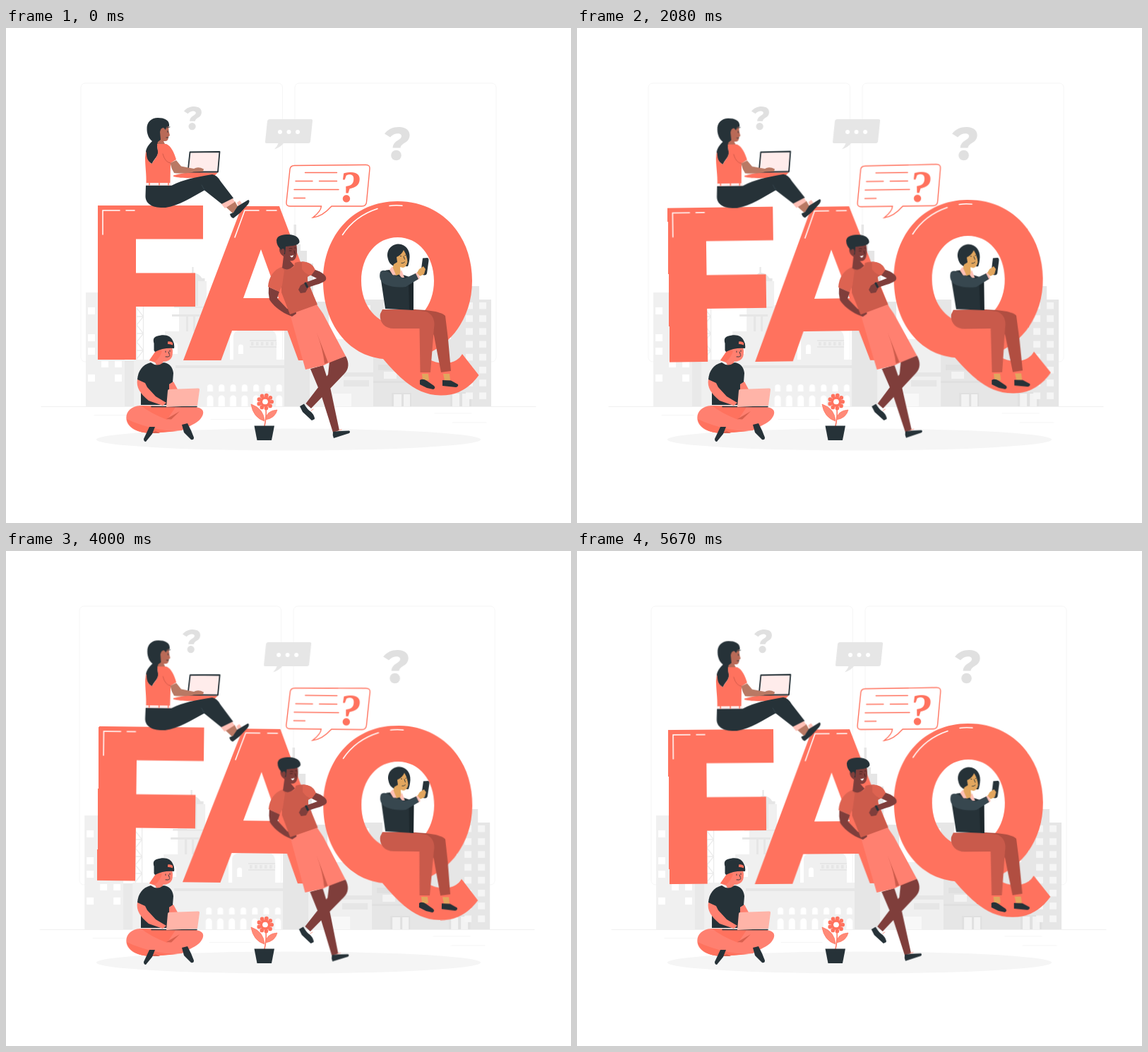
These frames come from a looping animation (800x700 px, 5.71 s). An HTML page:

```html
<!DOCTYPE html>
<html lang="en">
<head>
<meta charset="utf-8">
<title>FAQ</title>
<style>
  html, body { margin: 0; width: 100%; height: 100%; overflow: hidden; background: #fff; }
  svg { display: block; width: 100vw; height: 100vh; }

  .sway { animation: sway 5.71s linear infinite; }
  .slide { animation: slide 5.71s linear infinite; }
  #letters { transform-origin: 400px 382px; }
  #typist { transform-origin: 271px 198px; }
  #bubble { transform-origin: 456px 231px; }
  #leaner { transform-origin: 429px 436px; }
  #caller { transform-origin: 585px 408px; }

  /* A 3 s cycle, cut off at 5.71 s */
  @keyframes sway {
    0% { transform: rotate(0deg); }
    13.135%, 65.674% { transform: rotate(1deg); }
    39.405%, 91.944% { transform: rotate(-1deg); }
    100% { transform: rotate(-.387deg); }
  }
  @keyframes slide {
    0%, 52.539% { transform: translateX(0); }
    5.254%, 47.285%, 57.793%, 99.825% { transform: translateX(-1.4px); }
    10.508%, 42.032%, 63.047%, 94.571% { transform: translateX(2.8px); }
    15.762%, 26.27%, 36.778%, 68.301%, 78.809%, 89.317% { transform: translateX(-5.6px); }
    21.016%, 31.524%, 73.555%, 84.063% { transform: translateX(5.6px); }
    100% { transform: translateX(-1.35px); }
  }

  .coral { fill: #ff725e; }
  .dark { fill: #263238; }
  .white { fill: #fff; }
  .g1 { fill: #f0f0f0; }
  .g2 { fill: #e6e6e6; }
  .g3 { fill: #e0e0e0; }
  .line { fill: none; stroke-linecap: round; }
  .flat { fill: none; }
  .shine { stroke: #fff; stroke-width: 1.5; }
</style>
</head>
<body>
<svg viewBox="0 0 800 700">
  <defs>
    <g id="mark" class="g3">
      <path d="M536 149.500C541 143 548 140 556 140C566 140 572 145 571.500 152C571 163 559.500 162 558.500 169.500H547.500C548 159 559.500 159 560 153C560 147.500 549 148 544 154.500z"/>
      <circle cx="552.500" cy="180" r="7.300"/>
    </g>
    <pattern id="arches" x="282" y="503" width="16.300" height="32" patternUnits="userSpaceOnUse">
      <path class="white" d="M3 11V5a4 4 0 0 1 8 0v6zM2.500 32V21a4.500 4.500 0 0 1 9 0v11z"/>
    </pattern>
    <pattern id="panes" x="651" y="388" width="19" height="18.200" patternUnits="userSpaceOnUse">
      <path fill="#f5f5f5" d="M0 0h10v9.500H0z"/>
    </pattern>
  </defs>

  <g class="slide">
    <g fill="none" stroke="#f5f5f5">
      <rect x="106" y="78" width="285.500" height="394" rx="6"/>
      <rect x="409" y="78" width="285" height="394" rx="6"/>
    </g>

    <!-- left block and mast -->
    <path class="g1" d="M113 374h55v161h-55z"/>
    <path fill="#e9e9e9" d="M168 470h28v65h-28z"/>
    <path class="white" d="M116 395h10v10h-10zM116 433h10v10h-10zM116 452h10v10h-10zM116 490h10v10h-10zM135 471h10v9h-10zM154 471h10v9h-10zM154 490h10v10h-10z"/>
    <path class="line" stroke="#ebebeb" stroke-width="1.300" d="M185 392V470M194.500 392V470M185 396l9.500 12-9.500 12 9.500 12-9.500 12 9.500 12-9.500 12M185 408h9.500m-9.500 24h9.500m-9.500 24h9.500"/>

    <!-- domed hall -->
    <path class="g1" d="M245 392h75v40h-75zM225 429h92v45h-92zM322 436q0-9 14-9h38q9 1 9 13v32h-61z"/>
    <path class="g2" d="M263.500 338h2v8q8 1 12 8h4v4h-28v-4h4q2-7 6-8zM238 393h44v2.500h-44zM235 405h40v3h-40zM255 408h3v21h-3zM265 408h3v21h-3z"/>
    <path class="g1" d="M258 358h26v36h-26z"/>
    <path class="g2" d="M268 358h4v35h-4zM345 441h38v2h-38zM345 450h38v2h-38z"/>
    <path class="flat" stroke="#e6e6e6" stroke-width="5" stroke-dasharray="3.500 3.500" d="M347 446.500h36"/>
    <path class="white" d="M329 461v-10a3.500 3.500 0 0 1 7 0v10zM235 461v-12a4 4 0 0 1 8 0v12z"/>
    <path class="g1" d="M181 469h219v66H181z"/>
    <path class="g2" d="M240 477h160v4H240z"/>
    <path fill="url(#arches)" d="M282 503h112v32H282z"/>

    <!-- spire tower -->
    <path class="g2" d="M407.500 278h3.500v28h6v9h9v18h9v54h22v148h-63V390h6V315h7.500z"/>

    <!-- right blocks -->
    <path class="g1" d="M430 440h90v95h-90z"/>
    <path class="g2" d="M478 487h42v6h-42zM478 498h36v9h-36zM503 384h32v70h-32z"/>
    <path fill="#f8f8f8" d="M463 517h26v18h-26zM507 392h9v9h-9z"/>
    <path class="g2" d="M520 440h110v95H520zM630 384h25v-19h15v19h17v151h-57z"/>
    <path class="g3" d="M520 499h70v3h-70zM527 476h28v8h-28zM546 516h28v19h-28zM629 515h30v20h-30z"/>
    <path fill="#f3f3f3" d="M535 486h18v10h-18zM549 518h11v17h-11zM563 518h9v17h-9zM632 517h10v18h-10zM646 517h10v18h-10z"/>
    <path fill="url(#panes)" d="M642 386h42v140h-42z"/>

    <path class="line" stroke="#f0f0f0" d="M50 535.500H750"/>
    <path class="line" stroke="#f5f5f5" d="M125 547.500h45M290 553.500h58M607 545h52M632 558h48"/>

    <use href="#mark"/>
    <use href="#mark" transform="translate(-124.300 12.700) scale(.702)"/>
    <path class="g2" d="M373 129h59q2.500 0 2 2.500l-3 29q-.5 2.500-3 2.500h-35q-5 6-13 8.500 4-4 5.500-8.500H369q-2.500 0-2-2.500l3-29q.5-2.500 3-2.500z"/>
    <g class="white">
      <circle cx="388" cy="147" r="3"/><circle cx="400.500" cy="147" r="3"/><circle cx="413" cy="147" r="3"/>
    </g>
  </g>

  <ellipse cx="400" cy="582" rx="272" ry="15.500" fill="#f5f5f5"/>

  <g id="letters" class="sway">
    <path class="coral" d="M130 251H279V298.500H184V346.500H268V394H184V469H130z"/>
    <path class="coral" fill-rule="evenodd" d="M334 252H387L470 470H414L398.500 428H320L304.500 470H251zM361 313L336 382H386z"/>
    <path class="coral" fill-rule="evenodd" d="M554.500 245C616 245 660 292 660 357.500C660 408 632 448 591 463C602 474 634 482 646 461L669.500 491C655 511 637 520 615 519.500C581 519 558 496 534 468C484 463 449 418 449 357.500C449 292 493 245 554.500 245zM554.500 296C525 296 503 322 503 357.500S525 419 554.500 419S606 393 606 357.500S584 296 554.500 296z"/>
    <path class="line shine" d="M137 292V258H161M170 258h12M324 296L338 258H358M369 258h14M476.500 292.500C488 275 506 262 526 255.500M543 251.500q9-1.500 18-.3"/>
  </g>

  <g id="bubble" class="sway">
    <path fill="#fff" stroke="#ff725e" stroke-width="1.400" d="M408.500 194.500L509.500 193.500Q515.500 193.500 515 199L510.500 246Q510 252 504 252H461C453 261 445 267 434.500 268C441 263 446 258 446.500 252H402Q396.500 252 397 246.500L402 200Q402.500 194.500 408.500 194.500z"/>
    <path class="line" stroke="#ff725e" stroke-width="1.400" d="M423.500 204.500h45M410 216.500h24M443.500 216.500h25M408 228.500h63M407.500 240.500h16"/>
    <text x="487" y="245.500" text-anchor="middle" class="coral" font-family="'Liberation Serif', serif" font-size="64" font-weight="700" font-style="italic">?</text>
  </g>

  <g id="typist" class="sway">
    <path fill="#b96a57" d="M218 139L230 137L230.500 146L232 152L230 153.500Q230 160 226 160L223 160L226 166L214 167L214 158z"/>
    <path class="dark" d="M231 139C232 130 224 127 215 127C206 127 199 133 199.500 143C199.500 151 203 157 207 160C200 167 197 172 198 180C199 187 204 191 207 192C208 187 214 183 215 178C216 173 213 167 215 161L219 158L218 147Q219 141 223 141L226 144L227 140z"/>
    <ellipse cx="221.500" cy="147.500" rx="2.500" ry="4" fill="#b96a57"/>
    <path class="line" stroke="#263238" stroke-width=".9" d="M225 141.500l7-1.500M229 145.500v2M227 155q2 1 3-.5"/>
    <path class="coral" d="M214 164L227 164C234 167 238 176 241 186L233 191L232.500 219H198.500C199 207 197 196 197 183Q197 178 199 174C198 187 204 191 207 192C208 187 216 182 215 174Q214 169 214 164z"/>
    <path class="line" stroke="#d65b4b" d="M222 178q3 12 11 13"/>
    <path class="coral" d="M237 208.500C249 205 263 203 280 204.500H300L295 209C278 212.500 250 213.500 237 210z"/>
    <path fill="#ffeceb" stroke="#263238" stroke-width="1.800" stroke-linejoin="round" d="M260.500 175.500L302.500 175L300 203.500H257.500z"/>
    <path fill="#b97964" d="M232.500 191L241 187L248 195.500L266 199Q272 195.500 280 199.500L279 203L266 203.500C255 206 244 206 238 205Q234 199 232.500 191z"/>
    <path class="dark" d="M198 222.500H235C252 214 268 211 292 207Q299 208 304 217L322 240.500L309.500 252L281 229.500C263 239 246 251 226 254C208 255 197 249 197.500 237z"/>
    <path class="line" stroke="#34444c" d="M281 229L277 222"/>
    <path fill="#ffeceb" d="M198 219h35l2 3.500h-37z"/>
    <path class="line" stroke="#ff725e" stroke-width="1.500" d="M203 219v3M217 219v3M230 219v3"/>
    <path fill="#b97964" d="M309 251L324 245L329 254L321 262z"/>
    <path fill="#ffc0b6" d="M305 249L321 241L324 246L310 255zM327 247l4-3 3 4-5 4z"/>
    <path class="dark" d="M317 263L322 261L328 252L343 243Q346 244 343 249L332 261L322 269Q318 268 317 263z"/>
  </g>

  <g id="leaner" class="sway">
    <path fill="#7f3e3b" d="M458 472L481 464C486 473 486 482 479 489L432 538L424.500 531L456 490zM431 482L449 477L459 508L472 569L463 572L446 518z"/>
    <path class="dark" d="M463 571L472 570L486 569.500Q488 571 486 573L464 580Q462 576 463 571zM416 535L422 531.500Q427 540 432 543Q437 548 437 553L433 555L420 543z"/>
    <path class="line" stroke="#ff9a8b" d="M432 541l3-2M471 569l4-1"/>
    <path fill="#ff8070" d="M402 404L440 391L449 404L481 464L456 474L450 477L424 483z"/>
    <path fill="#cc5b4b" d="M440 431L456 473L451 475Q449 455 440 431z"/>
    <path fill="#7f3e3b" d="M372 366L387 373L384 382L398 397L410 398.500L411 404L405 408L398 405C387 400 377 391 373 384Q371 375 372 366z"/>
    <path fill="#cc5b4b" d="M390 338Q399 344 408 337L409 332C419 329 430 331 435 337L439 345L427 352L427 358L441 391L402 405L390 374z"/>
    <path fill="#dd6351" d="M390 338C379 342 372 352 371 366L387 373L391 364L394 343zM419 330.500C429 330 436 336 439 345L432 350Q425 349 419 341z"/>
    <path fill="#7f3e3b" d="M438 342C447 345 455 350 453 356C450 361 438 363 428 367L424 374L417 375L414 370L417 364L424 360L440 354L432 350z"/>
    <path class="line" stroke="#263238" stroke-width="3" d="M424 361l2.500 5"/>
    <path fill="#7f3e3b" d="M389 306L411 305C413 315 412 325 408 328Q405 330 402 329L408 336Q399 345 391 339L393 323Q387 319 387 313z"/>
    <path class="dark" d="M383 300C384 293 392 292 400 292C410 292 416 297 415.500 303C413 308 405 308 396 309L395 320Q391 319 389 313Q383 308 383 300z"/>
    <ellipse cx="392" cy="316" rx="2.500" ry="4" fill="#7f3e3b"/>
    <path class="line" stroke="#4b2422" d="M401 312q2-1 4 0M408.500 311q1.500-.8 2 0M401 315h3M408 315l1 4"/>
    <path class="white" d="M402 322q3 .5 5-1-.5 3.500-3 3.500z"/>
  </g>

  <g id="caller" class="sway">
    <path fill="#b14e41" d="M570 398C592 398 615 400 622 407L626 440L630 485L616 487L606 435L592 405z"/>
    <path fill="#c95a4b" d="M533 398H572L595 401C604 405 608 413 606 424L601 487H586.500L585.500 425H549C535 425 528 414 530 404z"/>
    <path fill="#e2a65e" d="M589 489h9l1 9h-9zM619 489h9l1 9h-8z"/>
    <path class="dark" d="M586 498Q590 495 596 499L606 506Q609 509 605 511L596 509L586 504zM618 498L630 498.500L640 504Q641 507 637 508L618 506z"/>
    <path class="dark" d="M530 350Q533 342 543 342L562 349L577 354V399L537 397z"/>
    <path fill="#1d272c" d="M570 360L577 357V399L571 398z"/>
    <path class="dark" d="M540.500 325C538 313 547 305.500 556 305.500C566 306 572 314 571.500 324Q571 332 569 337L556 337C548 338 542 334 540.500 325z"/>
    <path fill="#e2a65e" d="M549 334L554 331L553 324Q560 321 563 314Q568 322 568.500 331Q567 338 562 339L558 338L559 348L552 350L546 344z"/>
    <path class="line" stroke="#263238" stroke-width=".9" d="M558.500 322.500h1M565 321.500h.5M563 323l1.500 4M560 332.500q3 .5 4.500-1.500"/>
    <path fill="#ffc0b6" d="M543 342L547 337L552 349L548 350zM557 349L560 342L564 353L560 353zM578 348L583 345L586 354L581 357z"/>
    <path fill="#37474f" d="M530 345C534 340 541 344 547 349L565 354L580 347L584 355L566 366Q551 368 538 363C529 359 528 351 530 345z"/>
    <path class="dark" d="M590 325.500L597 325Q599 326 598.500 329L596 347Q595 350 592 349.500L587 348.500z"/>
    <path fill="#e2a65e" d="M582 346L585 341L591 337L594 341L592 348L586 351z"/>
  </g>

  <!-- seated boy -->
  <g>
    <path fill="#ff8070" d="M214 454L203 470L211 473L214 478H222L222 472Q232 472 235 465Q237 458 235 451z"/>
    <path class="coral" d="M214 454L203 470L211 472Q218 466 221 457z"/>
    <path class="dark" d="M209.500 456V446Q207 438 213 436C225 432 233 435 236 442Q239 447 238 453Q222 452 211 458z"/>
    <path class="coral" d="M229 443.500q4-1 7 1.500v3.500q-3-2-7-1.500z"/>
    <path class="line" stroke="#263238" stroke-width=".9" d="M226 457v1.500M232 456v1.500M226 465q4 1 6-1.500M230 458l1.500 4"/>
    <path class="dark" d="M205 473Q214 480 223 473C231 474 236 479 237 488L236 501L231 504V533H191V506L186 497C187 485 193 476 205 473z"/>
    <path fill="#ff8070" d="M186 497L197 502L200 508L212 521L227 530L222 534L202 527C190 517 184 508 186 497zM231 504L237 500L243 511L231 515z"/>
    <path fill="#ff8070" d="M190 534C175 535 168 545 171 556C175 568 190 573 208 573L249 569L264 561C276 556 282 545 278 540C272 533 250 535 230 535z"/>
    <path class="coral" d="M191 534L240 536L228 554Q205 545 191 534zM171 553C185 560 215 570 243 570L208 573C190 573 175 568 171 553z"/>
    <path fill="#d9604f" d="M227 553L246 542L234 553.500zM204 573l8-3 6 3z"/>
    <path class="dark" d="M203 564L211 564L207 574L198 585Q195 585 195 581zM249 561L257 559L262 569L266 579Q266 583 262 582L252 572z"/>
    <path class="line" stroke="#263238" stroke-width="1.500" d="M206 535.500L270 535.500"/>
    <path fill="#ffb4a8" d="M231 511L272 509.500Q274.500 509.500 274 512L271 534L227 536L229 513Q229 511 231 511z"/>
  </g>

  <!-- potted flower -->
  <g>
    <path class="line" stroke="#ff725e" stroke-width="1.500" d="M368 538Q369 550 366 563"/>
    <path fill="#ff8a78" stroke="#ff725e" stroke-width=".7" d="M366 556Q350 551 347 532Q365 538 366 556zM367 554Q369 541 384 540Q381 552 367 554z"/>
    <circle class="line" cx="367" cy="528.500" r="9.200" stroke="#ff725e" stroke-width="5.700" stroke-dasharray="0 6.423"/>
    <circle class="line" cx="367" cy="528.500" r="5.500" stroke="#ff725e" stroke-width="4"/>
    <circle class="white" cx="367" cy="528.500" r="3.800"/>
    <path class="dark" d="M351.500 562.500H380L376 583H355.500z"/>
  </g>
</svg>
</body>
</html>
```
